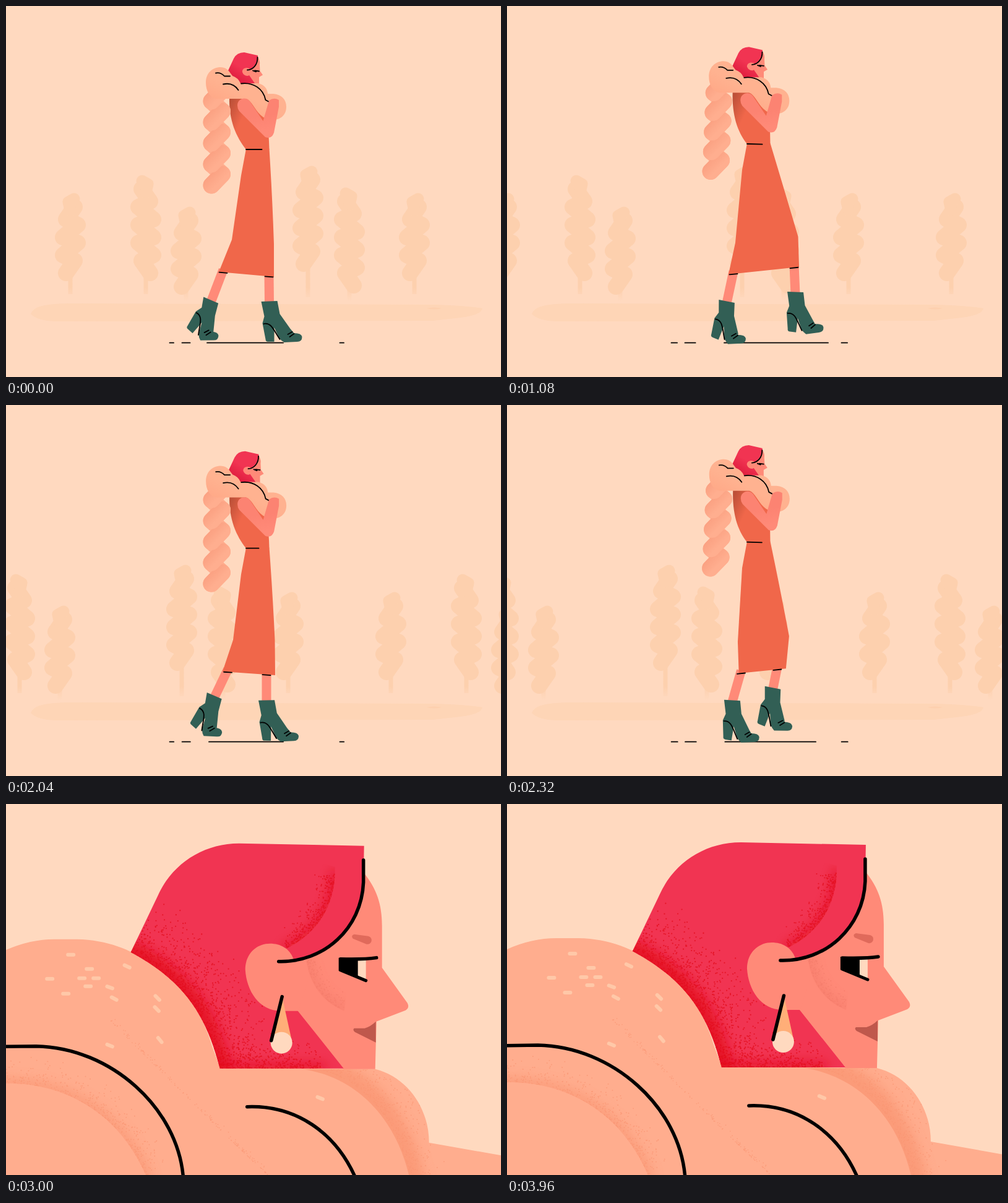
An HTML page that plays this animation: 800 by 600 pixels, repeating every 4000 ms.

```html
<!DOCTYPE html>
<html lang="en">
<head>
<meta charset="utf-8">
<title>Autumn walk</title>
<style>
html, body { margin: 0; width: 100%; height: 100%; overflow: hidden; background: #ffd9bf; }
svg { display: block; width: 100vw; height: 100vh; }
</style>
</head>
<body>
<svg id="stage" viewBox="0 0 800 600" fill="none" stroke-linecap="round" stroke-linejoin="round"></svg>
<script>
const LOOP = 4000, CUT = 2400, STEP = 2000 / 3;
const BG = '#ffd9bf', TREE = '#fdd0ae', SKIN = '#ff8a78', WOOL = '#ffad8e',
      DRESS = '#f0674a', BOOT = '#325f55', HAIR = '#f13452', RED = '#e30d1c', INK = '#000';

let seed = 7;
function rnd() {
  seed = (seed * 16807) % 2147483647;
  return seed / 2147483647;
}

const path = (d, attrs) => `<path d="${d}" ${attrs}/>`;
const fill = (d, color) => path(d, `fill="${color}"`);
const line = (d, color, width) => path(d, `stroke="${color}" stroke-width="${width}"`);

// Tree crowns are thick zigzags that taper towards the tip.
function tree(x, bottom, rows, dir) {
  const b = bottom - 13;
  let d = '';
  for (let k = 0; k < rows; k++) {
    const w = k === 0 || k === rows - 1 ? 7 : 12;
    const y = b - 29 * k;
    d += `${k ? 'L' : 'M'}${x - dir * w},${y}L${x + dir * w},${y - 20}`;
  }
  const y = b - 29 * rows;
  return `<rect x="${x - 3.5}" y="${bottom - 15}" width="7" height="${bottom > 440 ? 36 : 56}" fill="url(#trunk)"/>` +
    line(d, TREE, 26) + line(`M${x},${y + 14}L${x - dir * 3},${y + 1}L${x + dir * 6},${y - 4}`, TREE, 19);
}

function forest() {
  let s = '';
  for (const off of [0, 722]) {
    s += tree(104 + off, 445, 4, 1) + tree(226 + off, 445, 5, -1) + tree(291 + off, 467, 4, 1) +
         tree(488 + off, 430, 5, 1) + tree(555 + off, 465, 5, -1) + tree(660 + off, 445, 4, 1);
  }
  return s;
}

// Soft grainy shade hugging a cubic curve, limited to a region.
let clips = 0;
function shade(region, [a, b, c, d], depth, count, color, soft, dot = 2.2) {
  const id = 'clip' + clips++;
  let dots = '';
  for (let i = 0; i < count; i++) {
    const u = rnd(), v = 1 - u, r = rnd() * rnd() * depth;
    const at = k => v * v * v * a[k] + 3 * v * v * u * b[k] + 3 * v * u * u * c[k] + u * u * u * d[k];
    const slope = k => v * v * (b[k] - a[k]) + 2 * v * u * (c[k] - b[k]) + u * u * (d[k] - c[k]);
    const dx = slope(0), dy = slope(1), len = Math.hypot(dx, dy) || 1;
    dots += `M${(at(0) - dy / len * r).toFixed(1)},${(at(1) + dx / len * r).toFixed(1)}h.1`;
  }
  return `<clipPath id="${id}"><path d="${region}"/></clipPath><g clip-path="url(#${id})">` +
    path(`M${a}C${b} ${c} ${d}`, `stroke="${color}" stroke-width="${soft}" filter="url(#blur)" opacity=".8"`) +
    path(dots, `stroke="${color}" stroke-width="${dot}" opacity=".75"`) + '</g>';
}

function closeUp() {
  const scarf = 'M-20,245Q30,217 80,217L115,217C170,218 205,236 240,258C290,290 320,340 335,392L347,424L598,427' +
    'C650,440 685,490 685,546L820,570V620H-20Z';
  const hair = 'M203,238L247,146C270,95 320,62 378,62L580,66L579,125C576,200 515,255 442,253L473,333L547,426' +
    'L347,426C325,340 290,285 203,238Z';
  const fringe = 'M579,89L579,125C576,200 515,255 442,253';
  const dashes = [[106,242,0],[136,265,0],[72,281,0],[124,280,0],[147,280,0],[134,293,0],[98,305,0],[197,261,25],
    [169,295,20],[176,313,28],[246,312,45],[245,330,45],[250,380,50],[169,389,22],[509,474,22]];
  const wool = '#fa9673';
  return fill(scarf, WOOL) +
    shade('M-20,450H10C90,452 180,490 228,600H300V300H-20Z', [[-10,450],[90,448],[180,490],[228,600]], -48, 420, wool, 16, 1.8) +
    shade('M150,330L420,600H460V330Z', [[170,350],[250,430],[330,510],[425,600]], -9, 170, wool, 0, 1.6) +
    shade('M480,427C570,440 635,510 655,610H820V570L685,546C685,490 650,440 598,427Z',
      [[500,427],[580,440],[635,510],[658,610]], -62, 520, wool, 44, 1.8) +
    dashes.map(([x, y, r]) =>
      `<rect x="${x - 7.5}" y="${y - 3}" width="15" height="6" rx="3" fill="#ffc8a8" transform="rotate(${r} ${x} ${y})"/>`).join('') +
    line('M-20,391L50,390C170,392 280,490 288,605', INK, 5.5) +
    line('M391,488C470,485 535,530 567,605', INK, 5.5) +
    fill('M560,120L580,110C600,135 609,160 609,195V263L650,320Q654,328 647,332L600,350L598,427H547L440,320V250Z', SKIN) +
    fill(hair, HAIR) +
    shade(hair, [[203,238],[290,285],[325,340],[347,425]], -105, 900, RED, 36) +
    shade(hair, [[347,426],[400,426],[450,426],[510,426]], -50, 330, RED, 14) +
    shade('M533,100C535,160 505,210 450,234L400,200L500,90Z', [[533,112],[533,160],[505,210],[455,232]], 36, 330, RED, 12, 2) +
    fill('M466,249C460,232 445,224 428,224C405,224 388,242 388,266C390,300 410,333 446,333H474L500,250Z', SKIN) +
    shade('M486,245C490,290 515,320 548,333L560,250Z', [[487,250],[492,290],[515,318],[548,333]], -30, 130, '#f57c6b', 14, 1.8) +
    line(fringe, INK, 5.5) +
    fill('M564,209L587,212Q593,214 592,220Q590,226 584,225L562,216Q558,211 564,209Z', '#e06a5b') +
    fill('M539,247H572V281L539,268Z', INK) + fill('M570,249H583V283L570,278Z', BG) +
    line('M542,249Q580,250 600,247', INK, 5.5) + line('M542,267L583,284', INK, 5) +
    fill('M564,361H581Q591,358 599,350V384L565,367Q561,363 564,361Z', '#bf584c') +
    fill('M448,312L463,380H433Z', '#ffae78') +
    '<circle cx="446.500" cy="384.500" r="17.500" fill="#ffd9bf"/>' + line('M447.500,310L430,381', INK, 5.5);
}

function head() {
  const hair = 'M355,113L368,85Q373,75 385,75L407,80Q406,98 391,104L393,112L402,125L385,132Z';
  return fill('M400,82L407,82Q411,89 410,95L410.500,105L415,111.500L409,115L409,127L395,127L386,108Z', SKIN) +
    fill(hair, 'url(#hair)') + fill('M393,101C386,98 381,103 382,107Q384,113 391,113L397,110Z', SKIN) +
    line('M406.500,83C407,95 399,103 390,103.500', INK, 1.8) +
    line('M399,104.500L404,106.500M402,104.500L409,105.500', INK, 1.8);
}

function scarf() {
  return fill('M323,124C323,109 333,99 347,99Q355,99 360,105L366,113Q375,116 379,125L408,125Q422,129 423,142' +
      'L432,142C446,143 453,152 453,163C453,177 443,184 432,184Q419,184 411,176C401,166 397,153 388,150H340C329,148 323,137 323,124Z', 'url(#scarf)') +
    line('M339,108.500Q347,107 353,113.500H362M351,126.500Q367,123 375.500,136', INK, 1.8) +
    line('M380,125.500C400,123 416,134 419.500,152L430,157.500', INK, 1.8);
}

const ARM_D = 'M374,161C374,149 388,146 394,154L415.500,186L425,153Q433,147 441,152L441,163L433,205' +
  'Q429,216 419,212L377,170Q374,166 374,161Z';

const gradient = (id, box, from, to, extra = '') =>
  `<linearGradient id="${id}" gradientUnits="userSpaceOnUse" ${box}><stop stop-color="${from}"/><stop offset="1" stop-color="${to}" ${extra}/></linearGradient>`;

const stage = document.getElementById('stage');
stage.innerHTML = '<defs>' +
  gradient('trunk', 'x1="0" y1="455" x2="0" y2="477"', TREE, TREE, 'stop-opacity="0"') +
  gradient('hair', 'x1="368" y1="122" x2="382" y2="100"', '#dd1a3c', HAIR) +
  gradient('scarf', 'x1="325" y1="160" x2="345" y2="122"', '#ffa584', '#ffb290') +
  gradient('torso', 'x1="360" y1="160" x2="386" y2="172"', '#bd5038', DRESS) +
  gradient('arm', 'x1="412" y1="205" x2="408" y2="178"', '#ff8a78', '#fc8372') +
  gradient('puff', 'x1="-12" y1="-12" x2="4" y2="4"', '#fa9f80', '#ffae8f') +
  '<filter id="blur" filterUnits="userSpaceOnUse" x="-60" y="-20" width="920" height="680"><feGaussianBlur stdDeviation="9"/></filter>' +
  `</defs><rect width="800" height="600" fill="${BG}"/><g id="wide">` +
  fill('M40,498C45,486 60,481 110,481L690,483Q740,484 770,489Q768,500 735,504L690,509L80,510Q50,509 40,498Z', '#fed5b6') +
  fill('M680,489Q692,486 704,489Q692,492 680,489Z', '#fdcfae') +
  `<g id="forest">${forest()}</g>` +
  `<path id="ground" stroke="${INK}" stroke-width="1.8"/>` +
  [0, 1].map(i => `<path id="leg${i}" stroke="${SKIN}" stroke-width="15" stroke-linecap="butt"/>` +
    `<path id="boot${i}" fill="${BOOT}"/><path id="seam${i}" stroke="${INK}" stroke-width="1.8"/>`).join('') +
  `<path id="skirt" fill="${DRESS}"/><path id="torso" fill="url(#torso)"/>` +
  `<path id="marks" stroke="${INK}" stroke-width="1.8"/><path id="braid" stroke="${WOOL}" stroke-width="27"/><g id="tail">` +
  line('M-9,9L8.500,-9', 'url(#puff)', 27).repeat(5) + '</g>' +
  `<g id="head">${head()}</g><g id="scarf">${scarf()}</g>` +
  `<g id="arm">${fill(ARM_D, 'url(#arm)')}</g></g>` +
  `<g id="close">${closeUp()}</g>`;

const el = {};
stage.querySelectorAll('[id]').forEach(n => el[n.id] = n);
const puffs = [...el.tail.children].reverse();
const setD = (id, d) => el[id].setAttribute('d', d);
const move = (node, x, y) => node.setAttribute('transform', `translate(${x.toFixed(2)} ${y.toFixed(2)})`);

// Smooth curve through keys that repeats after the given period.
function keyed(times, values, period, t) {
  const n = times.length;
  const T = i => times[(i + n) % n] + period * Math.floor(i / n);
  const V = i => values[(i + n) % n];
  let i = n - 1;
  while (times[i] > t) i--;
  const slope = j => (V(j + 1) - V(j - 1)) / (T(j + 1) - T(j - 1));
  const h = T(i + 1) - T(i), u = (t - T(i)) / h, w = 1 - u;
  return w * w * (1 + 2 * u) * V(i) + u * u * (3 - 2 * u) * V(i + 1) +
    u * w * w * h * slope(i) - u * u * w * h * slope(i + 1);
}

const STEP_T = [0, .06, .3, .62, .66, .82];
const STEP_KEYS = {
  hemLx:  [344, 350, 388, 358, 355.5, 349],
  hemLy:  [430, 431, 434, 434, 436, 432],
  hemRx:  [433, 435, 428, 472, 473, 455],
  hemRy:  [438, 437, 432, 422, 424, 432],
  kneeLx: [365, 367, 376, 369, 368, 366],
  kneeLy: [378, 380, 383, 383, 384, 381],
  kneeRx: [433, 434.5, 438, 470.5, 467, 450],
  kneeRy: [385, 380, 375, 373, 373, 380],
  lineL:  [325, 328, 350, 351, 347, 336],
  lineR:  [448, 448, 475, 519, 527, 490],
  belt:   [414, 409, 411, 413, 411, 413],
  headX:  [0, 1.5, 5, 6, 5.5, 2.5]
};
const LEG_T = [0, .06, .4, .62, .66, 1, 1.06, 1.35, 1.62, 1.66, 1.8];
const LEG_KEYS = {
  hem:  [425, 421, 386, 366, 363, 351, 358.5, 411, 464, 465.5, 447],
  x:    [425.5, 421, 371, 355, 350.5, 331, 336.5, 396, 466, 470, 452],
  y:    [478, 478, 478, 478, 478, 476, 470.5, 456, 463, 465.5, 477],
  turn: [0, 1, 4, 22, 24, 41, 41, 32, 7, -1, -4],
  toe:  [0, 0, 0, 0, 0, 2, 5, 8, -5, -9, -6]
};
function pose(times, keys, period, t) {
  const out = {};
  for (const k in keys) out[k] = keyed(times, keys[k], period, t);
  return out;
}

// Pairs marked "s" follow the shaft, "t" the toe beyond the ball; the rest turn about the ankle.
const BOOT_D = 'Ms-13,0Ls13,-1L17,-2L34,22Lt16,-13Qt28,-13 t29,-7Qt29,1 t21,1Lt0,2Q20,42 16,37L8,20L8,43' +
  'L-2,43Q-6,43 -6,39L-11,13L-8,2Z';
const SEAM_D = 'M-9,14C3,11 7,24 17,39Mt6,-11Lt13,-15Mt9,-7Lt16,-12';
function spin(x, y, deg) {
  const a = deg * Math.PI / 180, c = Math.cos(a), s = Math.sin(a);
  return [x * c - y * s, x * s + y * c];
}
function bend(d, leg) {
  const tilt = leg.turn * .62;
  const ankle = spin(0, 22 - leg.turn * .12, tilt);
  const ball = spin(24, 42, leg.turn);
  return d.replace(/([st]?)(-?[\d.]+),(-?[\d.]+)/g, (_, part, x, y) => {
    let [px, py] = spin(+x, +y, part === 's' ? tilt : part === 't' ? leg.toe : leg.turn);
    if (part !== 's') { px += ankle[0]; py += ankle[1]; }
    if (part === 't') { px += ball[0]; py += ball[1]; }
    return (leg.x + px).toFixed(2) + ',' + (leg.y + py).toFixed(2);
  });
}

function drawWide(t) {
  const walk = t / STEP, p = walk % 1;
  const s = pose(STEP_T, STEP_KEYS, 1, p);
  const lift = 1 - Math.cos(2 * Math.PI * p);
  const ux = 2.1 * lift, uy = -5.2 * lift, wy = 232 + uy;

  move(el.forest, -t / 10, 0);
  const g = lift / 1.7;
  setD('ground', `M${264.5 + g},544.7H${271 + 4 * g}M${284.5 + 3 * g},544.7H${297.5 + 7 * g}` +
    `M${s.lineL},544.7H${s.lineR}M${539.5 + g},544.7H${546 + 4 * g}`);

  const slope = (s.hemRy - s.hemLy) / (s.hemRx - s.hemLx);
  const hemY = x => s.hemLy + (x - s.hemLx) * slope;
  let marks = `M388,${wy}L${s.belt - .5},${wy + g * .6}`;
  for (const i of [0, 1]) {
    const leg = pose(LEG_T, LEG_KEYS, 2, (walk + i) % 2);
    setD('leg' + i, `M${leg.hem},${hemY(leg.hem) - 4}L${leg.x},${leg.y + 3}`);
    setD('boot' + i, bend(BOOT_D, leg));
    setD('seam' + i, bend(SEAM_D, leg));
    marks += `M${leg.hem - 6.5},${hemY(leg.hem - 6.5) + .6}L${leg.hem + 6.5},${hemY(leg.hem + 6.5) + .6}`;
  }
  setD('marks', marks);
  setD('skirt', `M388,${wy - 1}L380,${wy + 42}L${s.kneeLx},${s.kneeLy}L${s.hemLx},${s.hemLy}L${s.hemRx},${s.hemRy}` +
    `L${s.kneeRx},${s.kneeRy}Q${(s.kneeRx + 426) / 2 + 1},${wy + 78} 425.5,${wy - 1}Z`);
  setD('torso', `M${361 + ux},${148 + uy}C${360 + ux},${185 + uy} 372,${wy - 20} 388,${wy}` +
    `H425.5Q425,${wy - 25} ${421 + ux},${178 + uy}L${415 + ux},${148 + uy}Z`);

  let braid = '';
  puffs.forEach((puff, k) => {
    const x = 341 + 1.3 * lift - .75 * lift * k;
    const y = 145 - 7.8 * lift + (34 - 1.3 * lift) * k;
    move(puff, x, y);
    braid += `${k ? 'L' : 'M'}${x + 8.5},${y - 9}L${x - 9},${y + 9}`;
  });
  setD('braid', braid);
  move(el.head, s.headX, -5 * lift);
  move(el.scarf, 1.9 * lift, -5.6 * lift);
  move(el.arm, 1.9 * lift, -4.9 * lift);
}

function drawClose(t) {
  const sway = (1 - Math.cos(2 * Math.PI * (t - 2700) / (2 * STEP))) / 2;
  move(el.close, -3.1 * sway, 4.1 * sway - .1);
}

function frame(now) {
  const t = now % LOOP, wide = t < CUT;
  el.wide.style.display = wide ? '' : 'none';
  el.close.style.display = wide ? 'none' : '';
  if (wide) drawWide(t); else drawClose(t);
}

let start = null;
function tick(now) {
  if (start === null) start = now;
  frame(Math.max(0, now - start));
  requestAnimationFrame(tick);
}
frame(0);
requestAnimationFrame(tick);
</script>
</body>
</html>
```
